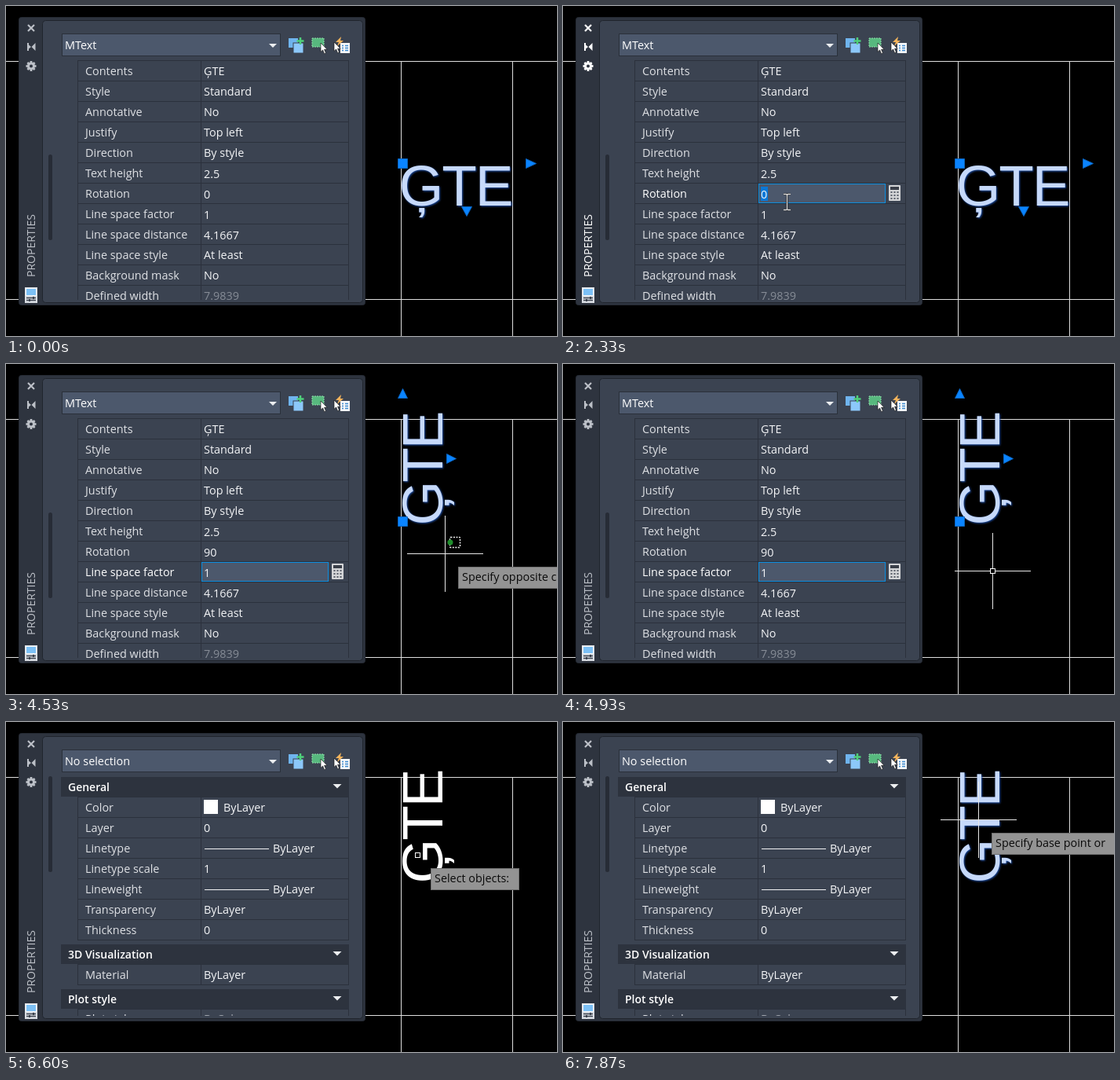
Write an HTML page that moves like this. It is 702 px wide and 420 px high and loops after 8 s.

```html
<!DOCTYPE html>
<html lang="en">
<head>
<meta charset="utf-8">
<title>Text rotation</title>
<style>
html, body { margin: 0; width: 100%; height: 100%; overflow: hidden; background: #000; }
svg { display: block; width: 702px; height: 420px; }
text { font: 14.4px "Open Sans", "Noto Sans", sans-serif; white-space: pre; }
.cad { font: 73px "Liberation Sans", Arial, sans-serif; letter-spacing: -2px; }
.picked { filter: drop-shadow(1px 1px 1px #1f4fa6); }
.head { font-weight: 600; font-size: 14px; }
.on { font-weight: 500; }
</style>
</head>
<body>
<svg id="stage" viewBox="0 0 702 420"></svg>
<script>
const LOOP = 8000, STEP = 200 / 3;
const stage = document.getElementById('stage');

const rect = (x, y, w, h, fill, more = '') =>
  `<rect x="${x}" y="${y}" width="${w}" height="${h}" fill="${fill}" ${more}/>`;
const path = (d, fill, more = '') => `<path d="${d}" fill="${fill}" ${more}/>`;
const text = (x, y, s, fill = '#f4f5f7', more = '') =>
  `<text x="${x}" y="${y}" fill="${fill}" ${more}>${s}</text>`;
const group = (x, y, body) => `<g transform="translate(${x} ${y})">${body}</g>`;

const LINE = '#2b313c', LABEL = '#dfe1e5', FIELD = '#4c586c', BLUE = '#0a84ff', WIRE = '#dedede';
const ARROW = path('M0 0V17.5L4 13.8 7 21 10 19.7 7 12.8H12.5Z', '#fff', 'stroke="#111"');

// Pointer path: time, x, y
const KEYS = [
  [130, 650, 465], [1000, 324, 229], [1070, 324, 229], [1330, 239, 244],
  [1470, 239, 244], [2330, 281, 247], [3870, 281, 247], [4530, 559, 241],
  [4730, 548, 262], [4930, 547, 263], [6200, 547, 263], [6600, 524, 169],
  [6930, 529, 134], [7600, 529, 134], [7870, 529, 124]
];

function pointerAt(t) {
  const i = KEYS.findIndex(k => k[0] >= t);
  if (i < 1) return KEYS[i ? KEYS.length - 1 : 0].slice(1);
  const [t0, x0, y0] = KEYS[i - 1], [t1, x1, y1] = KEYS[i];
  const p = (t - t0) / (t1 - t0), e = p * p * (3 - 2 * p);
  return [x0 + (x1 - x0) * e, y0 + (y1 - y0) * e].map(Math.round);
}

const MTEXT = [
  ['Contents', 'ĢTE'], ['Style', 'Standard'], ['Annotative', 'No'],
  ['Justify', 'Top left'], ['Direction', 'By style'], ['Text height', '2.5'],
  ['Rotation', '0'], ['Line space factor', '1'], ['Line space distance', '4.1667'],
  ['Line space style', 'At least'], ['Background mask', 'No'], ['Defined width', '7.9839']
];
const GENERAL = [
  ['Color', 'ByLayer'], ['Layer', '0'], ['Linetype', 'ByLayer'], ['Linetype scale', '1'],
  ['Lineweight', 'ByLayer'], ['Transparency', 'ByLayer'], ['Thickness', '0']
];

function grid(top, rows) {
  let s = '';
  for (const x of [91, 248, 436]) s += rect(x, top, 1, rows * 26, LINE);
  for (let i = 0; i <= rows; i++) s += rect(91, top + i * 26, 346, 1, LINE);
  return s;
}

function calculator(y) {
  let s = rect(415, y - 10, 15, 20, '#d4d5d7', 'rx="1"') + rect(417, y - 8, 11, 4, '#3a3f49');
  for (let i = 0; i < 9; i++)
    s += rect(417.5 + i % 3 * 4, y - 2 + Math.floor(i / 3) * 4, 2, 2, '#5a606b');
  return s;
}

function mtextRows(t) {
  const blank = t >= 3470 && t < 3530;
  const active = t < 1470 ? -1 : t < 3530 ? 6 : 7;
  const angle = t < 3070 ? '0' : t < 3130 ? '9' : '90';
  let s = blank ? '' : grid(69, 12);
  if (active > 0) {
    const y = 239 + (active - 6) * 26;
    s += rect(249.5, y - 12.5, 161, 24, FIELD, 'stroke="#0d8fe0"') + calculator(y - 1);
    if (t < 3070) s += rect(252, y - 9, 9, 18, '#0a78d7');
  }
  if (blank) s += rect(411, 252, 25, 25, '#f0f0f0');
  MTEXT.forEach(([label, value], i) => {
    const y = 88 + i * 26, on = i === active;
    if (!blank) s += text(101, y, label, on ? '#fff' : LABEL, on ? 'class="on"' : '');
    if (!blank || i) s += text(252, y + (i > 4 && i < 9 ? 1 : 0), i === 6 ? angle : value, i === 11 ? '#868c96' : undefined);
  });
  return s;
}

const header = (y, title) => rect(70, y, 367, 25, '#2d333e') +
  text(79, y + 18, title, '#fff', 'class="head"') +
  path(`M416.500 ${y + 9}h11l-5.500 5.500z`, '#eceef0');

function generalRows() {
  let s = header(70, 'General') + grid(95, 7);
  GENERAL.forEach(([label, value], i) => {
    const y = 114 + i * 26, lined = i === 2 || i === 4;
    if (lined) s += rect(253, y - 5, 82, 1, '#f2f3f5');
    s += text(101, y, label, LABEL) + text(lined ? 340 : i ? 252 : 277, y, value);
  });
  return s + rect(252, 99, 18, 18, '#fff') +
    header(283, '3D Visualization') + grid(308, 1) +
    text(101, 327, 'Material', LABEL) + text(252, 327, 'ByLayer') +
    header(340, 'Plot style') + grid(365, 1) +
    text(101, 383, 'Plot style', LABEL) + text(252, 383, 'ByColor', '#a0a5ad');
}

function titleBar(color) {
  let gear = '';
  for (let a = 0; a < 360; a += 45)
    gear += rect(-1.4, -6.5, 2.8, 4, color, `transform="rotate(${a})"`);
  gear += `<circle r="3.500" fill="none" stroke="${color}" stroke-width="3"/>`;
  return path('M28 24l8 8M36 24l-8 8', 'none', `stroke="${color}" stroke-width="2.200"`) +
    path('M27 47h2v10h-2zM29 49.500l3 2.500-3 2.500zM37.500 47v10l-5-5z', color) +
    group(32, 76.5, gear) +
    text(0, 0, 'PROPERTIES', color, 'transform="translate(37 345) rotate(-90)" style="font-size:14px"');
}

const TOOLS =
  rect(360, 41, 12, 12, '#6fb4ee') + rect(366, 47, 13, 13, '#8cc8fa', 'stroke="#3b4351"') +
  path('M375 40v9M370.500 44.500h9', 'none', 'stroke="#4fd07b" stroke-width="2.500"') +
  rect(390, 41, 15, 11, '#57b87e', 'stroke="#8fe3ac" stroke-dasharray="2 1"') +
  `<g transform="translate(401 47) scale(.65)">${ARROW}</g>` +
  rect(426, 47, 12, 13, '#f4f6f8') +
  path('M428 50.500h2M428 53.500h2M428 56.500h2M432 50.500h4M432 53.500h4M432 56.500h4', 'none', 'stroke="#3c8ad0" stroke-width="1.400"') +
  `<g transform="translate(418 46) scale(.65)">${ARROW}</g>` +
  path('M427 39l-7 7h4l-2 5 8-7h-4z', '#f5b45c');

const BADGE = rect(24, 358, 16, 20, '#d8dce2') + rect(25.5, 359.5, 13, 9, '#7cc0f5', 'stroke="#f5f7f9"') +
  path('M26 371.500h12M26 374.500h12', 'none', 'stroke="#3a414d" stroke-width="1.500"') +
  rect(34, 370, 2, 3, '#3a414d') + rect(29, 373, 2, 3, '#3a414d');

function panel(t, active) {
  const none = t >= 5330;
  return rect(16.5, 14.5, 441, 366, '#2e343f', 'rx="3" stroke="#252a33"') +
    rect(46.5, 18.5, 408, 359, '#3b4351', 'rx="4" stroke="#20252d"') +
    titleBar(active ? '#fff' : '#bcc0c7') + BADGE +
    rect(54, none ? 69 : 189, 5, none ? 122 : 109, '#272c36', 'rx="2.500"') +
    rect(71.5, 35.5, 278, 28, FIELD, 'stroke="#2a303a"') +
    text(75, 55, none ? 'No selection' : 'MText', '#fff') +
    path('M335 48h10l-5 5z', '#eceef0') + TOOLS +
    `<g clip-path="url(#list)">${none ? generalRows() : mtextRows(t)}</g>`;
}

function drawing(t) {
  const turned = t >= 3530, picked = t < 5270 || t >= 6860;
  const pose = turned ? 'translate(556 205.500) rotate(-90)' : 'translate(500.500 254)';
  let s = rect(0, 70, 702, 1, WIRE) + rect(0, 373, 702, 1, WIRE) +
    rect(503, 70, 1, 350, WIRE) + rect(645, 70, 1, 350, WIRE) +
    `<g class="${picked ? 'picked' : ''}">` +
    text(0, 0, 'ĢTE', picked ? '#c6d9fa' : '#fff', `class="cad" transform="${pose}"`) + '</g>';
  if (t < 5270) s += path('M499.500 194.500h12v12h-12z' + (turned
    ? 'M499.500 43.500h12l-6-12zM561.500 114.500v12l12-6z'
    : 'M662.500 194.500v12l13-6zM580.500 255.500h13l-6.500 12z'), BLUE, 'stroke="#0a62bd"');
  return s;
}

const tooltip = (w, s) => rect(17.5, 17.5, w, 27, '#939393', 'stroke="#6e6e6e"') + text(22, 35, s, '#0a0a0a');

function cadCursor(t, x, y) {
  const corner = t >= 4470 && t < 4870, selecting = t >= 6270 && t < 7670;
  const box = rect(-2.5, -2.5, 6, 6, 'none', 'stroke="#fff"');
  if (selecting) return group(x, y, box + tooltip(112, 'Select objects:'));
  const plain = corner || t >= 7670;
  let s = plain
    ? rect(-48, 0, 97, 1, '#e8e8e8') + rect(0, -48, 1, 97, '#e8e8e8')
    : rect(-48, 0, 45, 1, '#e8e8e8') + rect(4, 0, 45, 1, '#e8e8e8') +
      rect(0, -48, 1, 45, '#e8e8e8') + rect(0, 4, 1, 45, '#e8e8e8') + box;
  if (corner) s += rect(6.5, -20.5, 13, 13, 'none', 'rx="1" stroke="#eee" stroke-width="1.500" stroke-dasharray="2 1.500"') +
    '<circle cx="7" cy="-14" r="3.500" fill="#1f8f2c"/>' + tooltip(220, 'Specify opposite corner or');
  if (t >= 5930 && t < 6270) s += rect(17.5, 17.5, 54, 25, '#fff', 'stroke="#6e6e6e"') + text(22, 35, 'M', '#0a0a0a');
  if (t >= 7670) s += tooltip(220, 'Specify base point or');
  return group(x, y, s);
}

const BEAM = 'M0 2.500h3.500l1 1 1-1H9M4.500 3V22M0 22.500h3.500l1-1 1 1H9';
const IBEAM = path(BEAM, 'none', 'stroke="#20242b" stroke-width="3"') +
  path(BEAM, 'none', 'stroke="#dedede" stroke-width="1.300"');

function render(t) {
  const [x, y] = pointerAt(t);
  const inside = x < 458;
  const active = t >= 1470 && inside && !(t >= 3400 && t < 3470);
  let over = '';
  if (inside && (t < 3070 || t >= 3400)) {
    const editing = t >= 1470 && t < 3070 && x > 248;
    over = editing ? group(x, y - 10, IBEAM) : group(x, y, ARROW);
  }
  stage.innerHTML = '<clipPath id="list"><rect x="60" y="66" width="394" height="308"/></clipPath>' +
    drawing(t) + (t >= 200 && !inside ? cadCursor(t, x, y) : '') + panel(t, active) + over;
}

let last = -1;
const start = performance.now();
function tick() {
  const now = (performance.now() - start) % LOOP;
  const t = Math.round(Math.floor((now + 5) / STEP) * STEP / 10) * 10 % LOOP;
  if (t !== last) render(last = t);
  requestAnimationFrame(tick);
}
tick();
</script>
</body>
</html>
```
